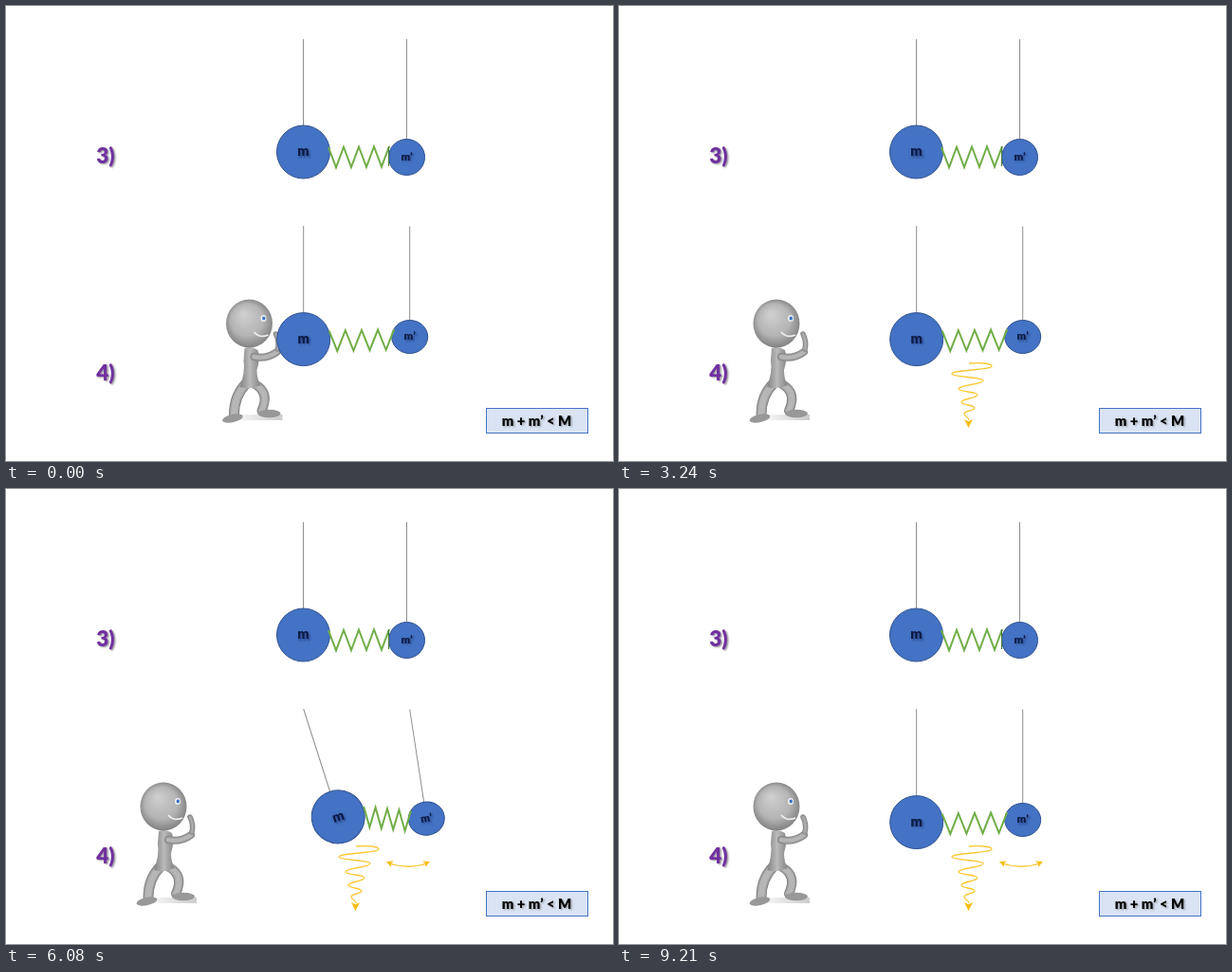
An HTML page with a canvas for the animation above (9270 ms loop, 640 by 480 pixels).

```html
<!DOCTYPE html>
<html lang="en">
<head>
<meta charset="utf-8">
<title>Coupled pendulums</title>
<style>
html, body { margin: 0; width: 100%; height: 100%; overflow: hidden; background: #fff; }
canvas { display: block; }
</style>
</head>
<body>
<canvas id="stage" width="640" height="480"></canvas>
<script>
const ctx = document.getElementById('stage').getContext('2d');
const LOOP = 9270;
const PUSH = 1400, PUSH_END = 3200, SWING = 3330, HALF = 1900;
const PEAK = (PUSH + PUSH_END) / 2;
const BLUE = '#4472c4', NAVY = '#0c1b45', GREEN = '#70ad47', GOLD = '#fac832';
const FONT = 'Lato, "Open Sans", sans-serif';

const clamp = (v, a = 0, b = 1) => Math.min(b, Math.max(a, v));
const lerp = (a, b, k) => a + (b - a) * k;
const span = (t, a, b) => clamp((t - a) / (b - a));
const ease = k => (1 - Math.cos(Math.PI * k)) / 2;

function line(points, color, width) {
  ctx.beginPath();
  points.forEach(([x, y], i) => i ? ctx.lineTo(x, y) : ctx.moveTo(x, y));
  ctx.strokeStyle = color;
  ctx.lineWidth = width;
  ctx.stroke();
}

function bend([a, b, c], color, width) {
  ctx.beginPath();
  ctx.moveTo(...a);
  ctx.quadraticCurveTo(...b, ...c);
  ctx.strokeStyle = color;
  ctx.lineWidth = width;
  ctx.stroke();
}

function oval(x, y, rx, ry, fill, stroke) {
  ctx.beginPath();
  ctx.ellipse(x, y, rx, ry, 0, 0, Math.PI * 2);
  ctx.fillStyle = fill;
  ctx.fill();
  if (stroke) {
    ctx.strokeStyle = stroke;
    ctx.lineWidth = 1;
    ctx.stroke();
  }
}

function text(str, x, y, size, color, shadow) {
  ctx.save();
  ctx.font = `900 ${size}px ${FONT}`;
  ctx.textAlign = 'center';
  ctx.fillStyle = color;
  ctx.shadowColor = shadow;
  ctx.shadowBlur = 2;
  ctx.shadowOffsetX = ctx.shadowOffsetY = 1.5;
  ctx.fillText(str, x, y);
  ctx.restore();
}

// Angle in degrees, positive to the right
function pendulum(px, py, length, rx, ry, label, size, deg) {
  const a = -deg * Math.PI / 180;
  ctx.save();
  ctx.translate(px, py);
  ctx.rotate(a);
  line([[0, 0], [0, length - ry]], '#8e8e8e', 1);
  oval(0, length, rx, ry, BLUE, '#2f528f');
  text(label, 0, length + size * 0.3, size, NAVY, 'rgba(20,35,90,.5)');
  ctx.restore();
  return [px - Math.sin(a) * length, py + Math.cos(a) * length];
}

function spring(a, b, depth) {
  const points = [];
  for (let i = 0; i <= 8; i++) {
    const k = i / 8;
    points.push([lerp(a[0], b[0], k), lerp(a[1], b[1], k) + (i % 2 ? depth : 0)]);
  }
  line(points, GREEN, 2);
}

function limb(points, width) {
  ctx.lineCap = 'round';
  bend(points, '#858585', width);
  bend(points, '#a2a2a2', width - 2);
  bend(points, '#b6b6b6', width - 4.5);
  ctx.lineCap = 'butt';
}

function torso() {
  const g = ctx.createLinearGradient(158, 0, 177, 0);
  g.addColorStop(0, '#8c8c8c');
  g.addColorStop(0.45, '#bababa');
  g.addColorStop(1, '#888');
  ctx.beginPath();
  ctx.moveTo(161, 361);
  ctx.quadraticCurveTo(168, 358, 175, 363);
  ctx.quadraticCurveTo(178, 372, 174, 384);
  ctx.quadraticCurveTo(174, 394, 178, 400);
  ctx.quadraticCurveTo(167, 405, 156, 402);
  ctx.quadraticCurveTo(162, 386, 160, 374);
  ctx.closePath();
  ctx.fillStyle = g;
  ctx.fill();
}

function man(dx, dy) {
  ctx.save();
  ctx.translate(dx, dy);
  const ground = ctx.createLinearGradient(145, 0, 202, 0);
  ground.addColorStop(0, 'rgba(150,150,150,0)');
  ground.addColorStop(1, 'rgba(150,150,150,.5)');
  ctx.fillStyle = ground;
  ctx.fillRect(150, 431, 51, 6);

  limb([[172, 399], [188, 408], [179, 427]], 10);
  oval(187, 430, 12, 4.2, '#989898');
  limb([[163, 398], [150, 411], [150, 431]], 11);
  ctx.save();
  ctx.translate(148.5, 435);
  ctx.rotate(-0.2);
  oval(0, 0, 11, 4.2, '#989898');
  ctx.restore();
  torso();
  limb([[171, 370], [184, 373], [195, 365]], 8);
  limb([[196, 362], [198, 354], [194, 346]], 5.5);

  const g = ctx.createRadialGradient(160, 325, 2, 166, 335, 27);
  g.addColorStop(0, '#cdcdcd');
  g.addColorStop(0.6, '#b4b4b4');
  g.addColorStop(1, '#7c7c7c');
  oval(166, 335, 24.5, 25.5, g);
  oval(181, 329.5, 3, 3.5, '#f1f1f1');
  oval(181.3, 329.5, 1.7, 2, '#3f72c8');
  bend([[171, 344], [177, 351], [186, 347]], '#ededed', 1.7);
  ctx.restore();
}

function pushArrow(dy) {
  const g = ctx.createLinearGradient(295, 0, 343, 0);
  g.addColorStop(0, '#ffbd00');
  g.addColorStop(1, '#fbd90a');
  ctx.save();
  ctx.translate(0, dy);
  ctx.beginPath();
  [[295, 390], [330, 390], [330, 383.5], [342.5, 396], [330, 408.5], [330, 402], [295, 402]]
    .forEach(([x, y]) => ctx.lineTo(x, y));
  ctx.closePath();
  ctx.fillStyle = g;
  ctx.fill();
  ctx.restore();
}

function tip(x, y, angle, size) {
  ctx.save();
  ctx.translate(x, y);
  ctx.rotate(angle);
  ctx.beginPath();
  ctx.moveTo(0, 0);
  ctx.lineTo(-size, -size / 2);
  ctx.lineTo(-size * 0.75, 0);
  ctx.lineTo(-size, size / 2);
  ctx.closePath();
  ctx.fillStyle = '#f9bd12';
  ctx.fill();
  ctx.restore();
}

function decay(k) {
  const turns = [[393, 380], [351, 388], [384, 395], [358, 404], [378, 410],
    [361, 418], [375, 424], [364, 430], [369, 437]];
  ctx.save();
  ctx.beginPath();
  ctx.rect(340, 370, 60, 80 * k);
  ctx.clip();
  ctx.beginPath();
  ctx.moveTo(369, 377);
  ctx.bezierCurveTo(380, 376, 393, 377, 393, 380);
  for (let i = 1; i < turns.length; i++) {
    const [x0, y0] = turns[i - 1], [x1, y1] = turns[i], mid = (y0 + y1) / 2;
    ctx.bezierCurveTo(x0, mid, x1, mid, x1, y1);
  }
  ctx.strokeStyle = GOLD;
  ctx.lineWidth = 1.3;
  ctx.stroke();
  tip(368.5, 445, Math.PI / 2, 9);
  ctx.restore();
}

function swingArrow() {
  bend([[403, 394.5], [424, 402], [445, 394.5]], GOLD, 1.3);
  tip(401, 393, Math.PI + 0.4, 7);
  tip(447, 393, -0.4, 7);
}

function angleAt(t) {
  if (t < SWING) return 8.4 * Math.sin(Math.PI * span(t, PUSH, PUSH_END));
  const s = -Math.sin(Math.PI * Math.min(3, (t - SWING) / HALF));
  return s * (s < 0 ? 19.8 : 18);
}

function fixedParts() {
  ctx.fillStyle = '#fff';
  ctx.fillRect(0, 0, 640, 480);
  text('3)', 105, 165.5, 22.5, '#7030a0', 'rgba(60,50,70,.55)');
  text('4)', 105, 394.5, 22.5, '#7030a0', 'rgba(60,50,70,.55)');
  pendulum(313.5, 35, 119, 28, 28, 'm', 14.5, 0);
  pendulum(422.5, 35, 124.5, 19, 19, 'm’', 11.5, 0);
  spring([340, 149], [404, 148], 21.5);
  line([[403.5, 148], [403.5, 169]], '#48803a', 1.2);
  ctx.fillStyle = '#dae3f3';
  ctx.fillRect(506.5, 424.5, 107, 26);
  ctx.strokeStyle = BLUE;
  ctx.lineWidth = 1;
  ctx.strokeRect(506.5, 424.5, 107, 26);
  text('m + m’ < M', 559.5, 442.5, 14.8, '#000', 'rgba(0,0,0,.3)');
}

function draw(t) {
  fixedParts();
  const forward = Math.sin(Math.PI / 2 * span(t, PUSH, PEAK));
  const back = ease(span(t, PEAK, 3150));
  man(lerp(90.5 + 24.5 * forward, 0, back), -2 * forward * (1 - back));

  const deg = angleAt(t);
  const big = pendulum(313.7, 232, 119.6, 28, 28, 'm', 14.5, deg);
  const small = pendulum(425.7, 232.5, 116.5, 19, 17.5, 'm’', 11.5, deg * 0.49);
  spring([big[0] + 27, big[1] - 9 - 0.75 * Math.min(deg, 3)],
    [small[0] - 16.5, small[1] - 7.8], 21.5);

  if (t >= 900 && t < PEAK) pushArrow(97 * (1 - span(t, 900, PUSH)));
  if (t >= 2600) decay(span(t, 2600, 3150));
  if (t >= SWING) swingArrow();
}

const start = performance.now();
function tick() {
  draw((performance.now() - start) % LOOP);
  requestAnimationFrame(tick);
}
tick();
</script>
</body>
</html>
```
